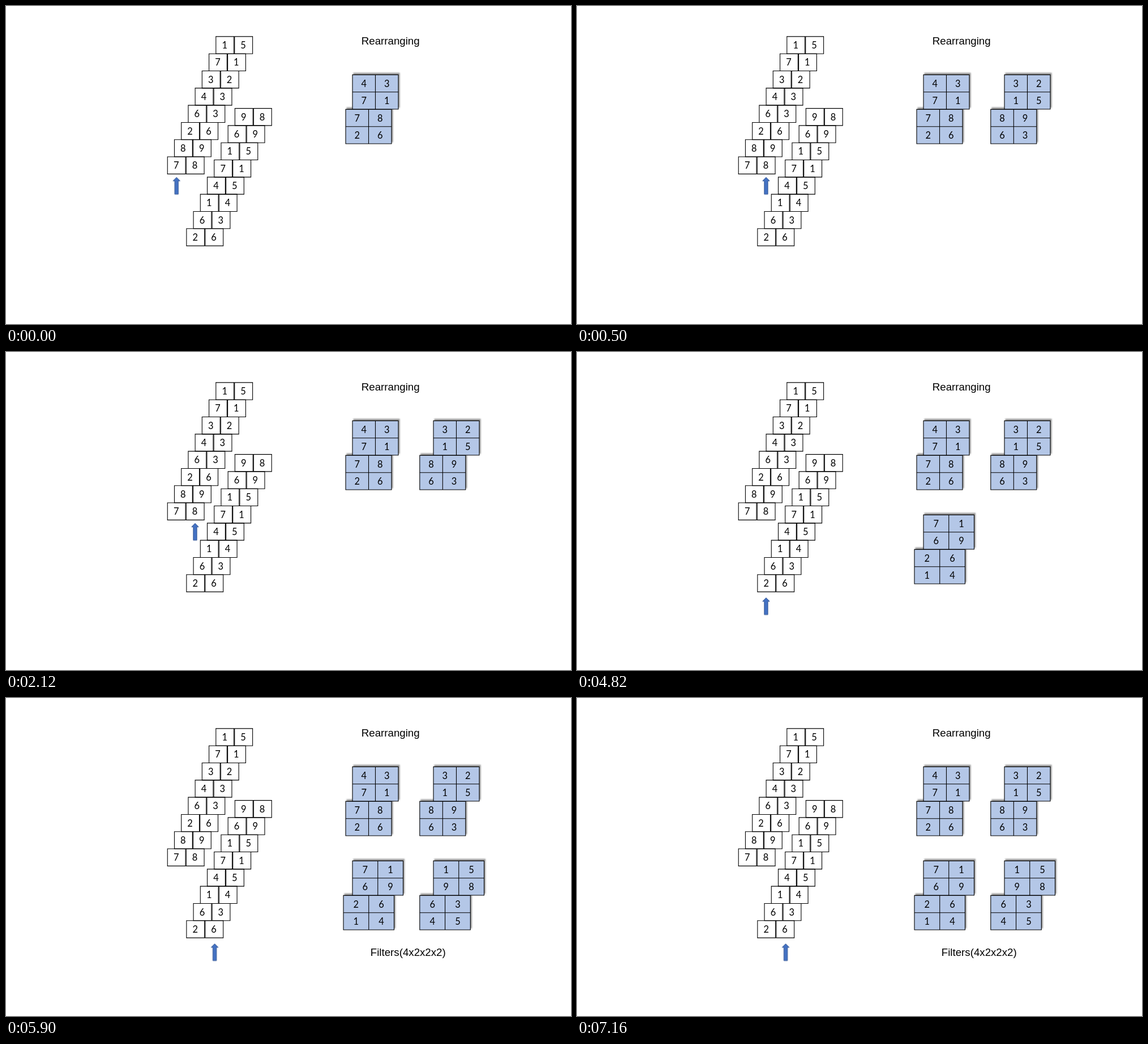
These frames come from a looping animation (998 by 561 pixels, 8000 ms). An HTML page:

```html
<!DOCTYPE html>
<html lang="en">
<head>
<meta charset="utf-8">
<title>Rearranging</title>
<style>
  html, body { margin: 0; width: 100%; height: 100%; overflow: hidden; background: #fff; }
  svg { display: block; width: 998px; height: 561px; }
  .digit { font: 16.4px Lato, Carlito, sans-serif; text-anchor: middle; }
  .label { font: 18.7px "Liberation Sans", Arial, sans-serif; }
  .line { fill: none; stroke: #000; stroke-width: 1.1; }
  .block { filter: drop-shadow(2.2px -2.2px 1.3px rgba(0, 0, 0, .4)); }
  .arrow { fill: #4472c4; stroke: #2f528f; stroke-width: 1; animation: hop 8s step-end infinite; }
  .step1 { animation: show1 8s step-end infinite; }
  .step2 { animation: show2 8s step-end infinite; }
  .step3 { animation: show3 8s step-end infinite; }
  @keyframes show1 { 0% { visibility: hidden } 6.25%, 100% { visibility: visible } }
  @keyframes show2 { 0% { visibility: hidden } 40%, 100% { visibility: visible } }
  @keyframes show3 { 0% { visibility: hidden } 73.75%, 100% { visibility: visible } }
  @keyframes hop {
    0% { transform: translate(301.2px, 302.3px) }
    6.25% { transform: translate(334px, 302.3px) }
    40% { transform: translate(334px, 433.6px) }
    73.75%, 100% { transform: translate(368.6px, 433.6px) }
  }
</style>
</head>
<body>
<svg id="stage" viewBox="0 0 998 561">
  <text class="label" x="627.8" y="68">Rearranging</text>
  <text class="label step3" x="643.8" y="454.5">Filters(4x2x2x2)</text>
  <path class="arrow" d="M0 0L6.2 6.2H3.1V29.8H-3.1V6.2H-6.2Z"/>
</svg>
<script>
const stage = document.getElementById('stage');

function add(parent, tag, attrs, text) {
  const el = document.createElementNS('http://www.w3.org/2000/svg', tag);
  for (const key in attrs) el.setAttribute(key, attrs[key]);
  if (text) el.textContent = text;
  return parent.appendChild(el);
}

const digit = (parent, x, y, text) => add(parent, 'text', { class: 'digit', x, y }, text);

// Slanted column of paired white cells, listed from top to bottom.
function stack(x0, y0, pairs) {
  pairs.split(' ').forEach((pair, i) => {
    const x = x0 - 12.22 * i, y = y0 + 30.31 * i;
    for (const left of [x, x + 33]) {
      add(stage, 'path', {
        class: 'line',
        d: `M${left - .6} ${y}h33M${left - .6} ${y + 30.31}h33M${left} ${y}v30.31M${left + 31.8} ${y}v30.31`
      });
    }
    digit(stage, x + 15.4, y + 21.2, pair[0]);
    digit(stage, x + 48.2, y + 21.2, pair[1]);
  });
}

// Blue 2x2 table with a shadow to the upper right.
function block(parent, x, y, w, digits) {
  const g = add(parent, 'g', { class: 'block' }), h = 60.6;
  add(g, 'rect', { x, y, width: w, height: h, fill: '#b4c7e7' });
  add(g, 'path', {
    class: 'line',
    d: [0, .5, 1].map(k => `M${x - .5} ${y + h * k}h${w + 1}M${x + w * k} ${y}v${h}`).join('')
  });
  [...digits].forEach((d, i) =>
    digit(parent, x + w * (i % 2 ? .75 : .25), y + 21.6 + (i > 1 ? h / 2 : 0), d));
}

function filterPair(step, topX, lowX, y, w, top, low) {
  const g = add(stage, 'g', { class: 'step' + step });
  block(g, lowX, y + 61, w, low);
  block(g, topX, y, w, top);
}

stack(370.8, 53.9, '15 71 32 43 63 26 89 78');
stack(404.4, 180.6, '98 69 15 71 45 14 63 26');
filterPair(0, 612, 600, 121.4, 81, '4371', '7826');
filterPair(1, 755, 730.8, 121.4, 81, '3215', '8963');
filterPair(2, 612, 596, 287.4, 89.5, '7169', '2614');
filterPair(3, 755, 730.8, 287.4, 89.5, '1598', '6345');
</script>
</body>
</html>
```
